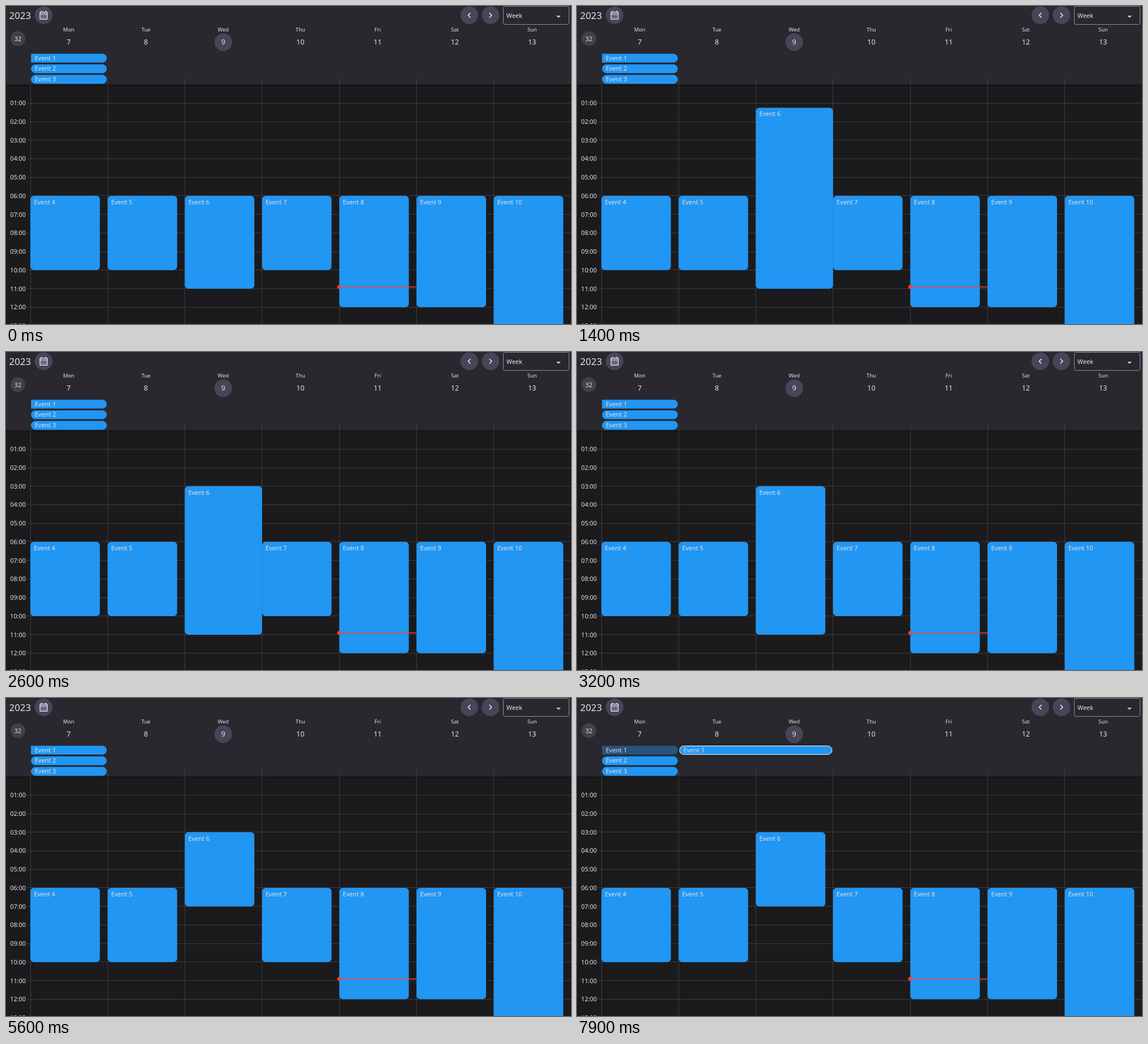
An HTML page with a canvas that plays this animation: 997x561 px, repeating every 8 s.

```html
<!DOCTYPE html>
<html lang="en">
<head>
<meta charset="utf-8">
<title>Week calendar</title>
<style>
  html, body { margin: 0; width: 100%; height: 100%; overflow: hidden; background: #1b1b1d; }
  canvas { display: block; }
</style>
</head>
<body>
<canvas id="stage" width="997" height="561"></canvas>
<script>
const ctx = document.getElementById('stage').getContext('2d');
const LOOP = 8000, TICK = 100;
const LEFT = 43, COL = 954 / 7, HOUR = 32.73;
const BLUE = '#2196f3', GHOST = 'rgba(33,150,243,.4)', TEXT = '#e6e1e5', BUTTON = '#4a4458';
const DAYS = ['Mon', 'Tue', 'Wed', 'Thu', 'Fri', 'Sat', 'Sun'];

const colX = day => LEFT + day * COL;
const hourY = hour => 138.6 + hour * HOUR;

const calendarIcon = new Path2D('M19 4h-1V2h-2v2H8V2H6v2H5c-1.1 0-2 .9-2 2v14c0 1.1.9 2 2 2h14c1.1 0 2-.9 2-2V6c0-1.1-.9-2-2-2zm0 16H5V10h14v10zm0-12H5V6h14v2zM9 14H7v-2h2v2zm4 0h-2v-2h2v2zm4 0h-2v-2h2v2zm-8 4H7v-2h2v2zm4 0h-2v-2h2v2zm4 0h-2v-2h2v2z');
const leftIcon = new Path2D('M15.41 7.41 14 6l-6 6 6 6 1.41-1.41L10.83 12z');
const rightIcon = new Path2D('M8.59 16.59 10 18l6-6-6-6-1.41 1.41L13.17 12z');

// Drag keyframes: [time in ms, hour]
const TOP_KEYS = [[900, 6], [1000, 5.5], [1100, 4.5], [1300, 2], [1400, 1.25], [1500, 1], [1700, 1.75],
  [1800, 2.75], [2000, 6.25], [2100, 7.5], [2200, 7.5], [2500, 3.75], [2600, 3], [2700, 2.75], [2800, 2.75], [2900, 3]];
const BOTTOM_KEYS = [[4800, 11], [4900, 10], [5100, 7.5], [5200, 7]];

function valueAt(keys, t) {
  if (t <= keys[0][0]) return keys[0][1];
  for (let i = 1; i < keys.length; i++) {
    const [t0, a] = keys[i - 1], [t1, b] = keys[i];
    if (t <= t1) return a + (b - a) * (t - t0) / (t1 - t0);
  }
  return keys[keys.length - 1][1];
}
const quarter = hour => Math.round(hour * 4) / 4;

function text(str, x, cy, size, { align = 'left', weight = 400, color = TEXT } = {}) {
  ctx.font = `${weight} ${size}px "Noto Sans", "Open Sans", sans-serif`;
  ctx.textAlign = align;
  ctx.fillStyle = color;
  ctx.fillText(str, x, cy + size * .357);
}

function box(x, y, w, h, radius, fill, stroke) {
  ctx.beginPath();
  ctx.roundRect(x, y, w, h, radius);
  if (fill) { ctx.fillStyle = fill; ctx.fill(); }
  if (stroke) { ctx.strokeStyle = stroke; ctx.lineWidth = 1; ctx.stroke(); }
}

function disc(x, y, r, fill) {
  ctx.beginPath();
  ctx.arc(x, y, r, 0, 7);
  ctx.fillStyle = fill;
  ctx.fill();
}

function iconButton(x, y, icon) {
  disc(x, y, 15.6, BUTTON);
  ctx.save();
  ctx.translate(x, y);
  ctx.scale(.78, .78);
  ctx.translate(-12, -12);
  ctx.fillStyle = '#e8def8';
  ctx.fill(icon, 'evenodd');
  ctx.restore();
}

function event(n, day, from, to, { wide = false, fill = BLUE } = {}) {
  const x = colX(day), y = hourY(from);
  box(x, y, COL * (wide ? 1 : .9), hourY(to) - y, 6.2, fill);
  text('Event ' + n, x + 6.2, y + 11, 10.9);
}

function allDay(n, y, fill, flat) {
  box(44.2, y, 133.6, 15.6, flat ? [0, 7.8, 7.8, 0] : 7.8, fill);
  text('Event ' + n, 50.8, y + 7.7, 10.9);
}

function drawGrid() {
  ctx.fillStyle = '#1b1b1d';
  ctx.fillRect(0, 0, 997, 561);
  const shadow = ctx.createLinearGradient(0, 138, 0, 143);
  shadow.addColorStop(0, 'rgba(0,0,0,.4)');
  shadow.addColorStop(1, 'rgba(0,0,0,0)');
  ctx.fillStyle = shadow;
  ctx.fillRect(0, 138, 997, 5);
  ctx.fillStyle = '#29282f';
  ctx.fillRect(0, 0, 997, 138.5);

  ctx.fillStyle = '#3d3d40';
  for (let h = 1; h <= 12; h++) ctx.fillRect(38, Math.floor(hourY(h)), 959, 1);
  for (let d = 0; d < 7; d++) ctx.fillRect(Math.floor(colX(d)), 126, 1, 435);
  for (let h = 1; h <= 13; h++)
    text(String(h).padStart(2, '0') + ':00', 35, hourY(h), 10.9, { align: 'right', weight: 500 });
}

function drawHeader() {
  text('2023', 5.5, 16.5, 16.9);
  iconButton(66.4, 16.3, calendarIcon);
  iconButton(817.6, 16.3, leftIcon);
  iconButton(855, 16.3, rightIcon);
  box(877.5, .5, 116, 32, 3, null, '#8f8c96');
  text('Week', 883, 17, 10.9, { weight: 500 });
  ctx.beginPath();
  ctx.moveTo(971, 17);
  ctx.lineTo(979, 17);
  ctx.lineTo(975, 21);
  ctx.fillStyle = '#cac4d0';
  ctx.fill();

  disc(21, 57.5, 13, '#434147');
  text('32', 21, 57.7, 10.9, { align: 'center' });
  disc(383.4, 63.8, 15.6, BUTTON);
  DAYS.forEach((name, d) => {
    const x = colX(d) + COL / 2 - .5;
    text(name, x, 42, 9.4, { align: 'center', weight: 500 });
    text(String(7 + d), x, 64, 12.5, { align: 'center', weight: 500 });
  });
}

function drawAllDay(t) {
  const dragging = t >= 7400;
  allDay(1, 84.2, dragging ? GHOST : BLUE, true);
  allDay(2, 102.9, BLUE);
  allDay(3, 121.6, BLUE);
  if (!dragging) return;
  const p = (t - 7400) / 500;
  const x = 44.7 + 136.3 * p, right = 177.5 + 272.5 * p;
  const y = 84.6 + 18 * Math.sin(Math.PI * p);
  box(x, y, right - x, 15, 7.5, BLUE, '#fff');
  text('Event 1', x + 6.7, y + 8, 10.9);
}

function drawEvents(t) {
  event(4, 0, 6, 10);
  event(5, 1, 6, 10);
  event(7, 3, 6, 10);
  event(8, 4, 6, 12);
  event(9, 5, 6, 12);
  event(10, 6, 6, 15);

  const moveTop = t >= 900 && t < 3200, moveBottom = t >= 4600 && t < 5600;
  if (moveTop) event(6, 2, 6, 11, { fill: GHOST });
  if (moveBottom) event(6, 2, 3, 11, { fill: GHOST });
  event(6, 2, quarter(valueAt(TOP_KEYS, t)), quarter(valueAt(BOTTOM_KEYS, t)), { wide: moveTop || moveBottom });

  ctx.fillStyle = '#f44336';
  ctx.fillRect(colX(4), 494.8, COL, 1.5);
  disc(colX(4), 495.6, 3.5, '#f44336');
}

function frame() {
  const t = Math.floor(performance.now() % LOOP / TICK) * TICK;
  drawGrid();
  drawHeader();
  drawAllDay(t);
  drawEvents(t);
  requestAnimationFrame(frame);
}
frame();
</script>
</body>
</html>
```
